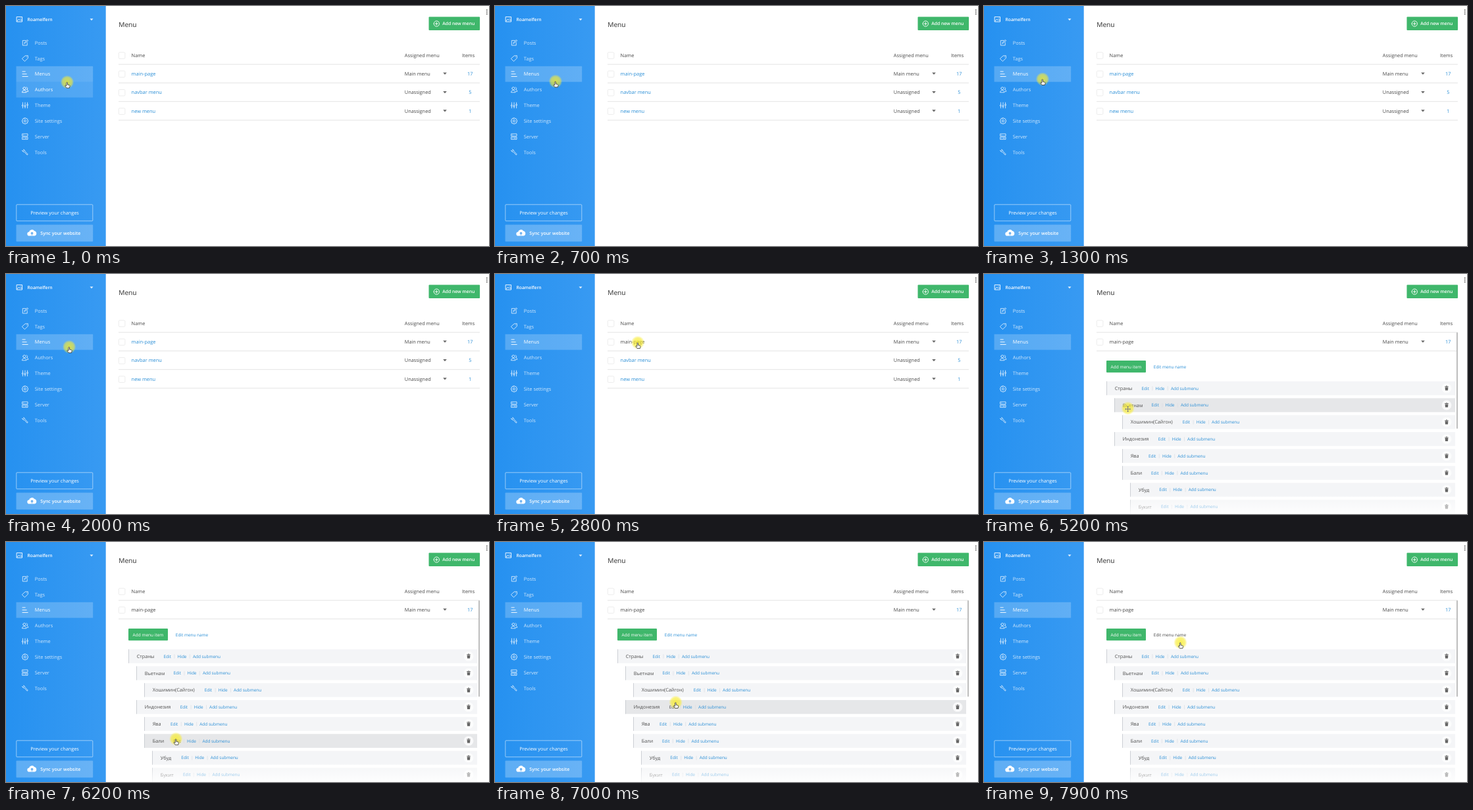
These frames come from a looping animation (734x366 px, 8000 ms). An HTML page:

```html
<!DOCTYPE html>
<html lang="en">
<head>
<meta charset="utf-8">
<title>Menu manager</title>
<style>
html, body { margin: 0; width: 100%; height: 100%; overflow: hidden; background: #fff; }
svg { display: block; width: 734px; height: 366px; }
text { font-family: "Open Sans", "Noto Sans", sans-serif; text-rendering: geometricPrecision; white-space: pre; }
.icon { fill: none; stroke: #fff; stroke-width: .9; stroke-linecap: round; stroke-linejoin: round; }
</style>
</head>
<body>
<svg id="stage" viewBox="0 0 734 366">
  <defs>
    <linearGradient id="blue"><stop stop-color="#2691f0"/><stop offset="1" stop-color="#389af2"/></linearGradient>
    <linearGradient id="veil" x2="0" y2="1">
      <stop stop-color="#fff" stop-opacity="0"/><stop offset="1" stop-color="#fff" stop-opacity=".85"/>
    </linearGradient>
    <radialGradient id="glow">
      <stop stop-color="#f8ec20" stop-opacity=".78"/><stop offset=".7" stop-color="#f8ec30" stop-opacity=".62"/>
      <stop offset="1" stop-color="#f8ec40" stop-opacity=".1"/>
    </radialGradient>
  </defs>
</svg>
<script>
const LOOP = 8000, STEP = 100, OPEN_AT = 3600;
const BLUE = '#2b8fd6', DARK = '#484848', GREEN = '#3fb76b';
const stage = document.getElementById('stage');

function add(parent, tag, attrs) {
  const el = document.createElementNS('http://www.w3.org/2000/svg', tag);
  for (const k in attrs) el.setAttribute(k, attrs[k]);
  return parent.appendChild(el);
}
const group = (parent, attrs = {}) => add(parent, 'g', attrs);
const rect = (parent, x, y, width, height, fill, more = {}) =>
  add(parent, 'rect', { x, y, width, height, fill, ...more });
const path = (parent, d, more = {}) => add(parent, 'path', { d, ...more });
const icon = (parent, x, y, d, more = {}) =>
  path(parent, d, { class: 'icon', transform: `translate(${x} ${y})`, ...more });

// Text whose capitals are centred on y
function label(parent, x, y, words, size, fill, more = {}) {
  const el = add(parent, 'text', { x, y: y + size * .36, 'font-size': size, fill, ...more });
  el.textContent = words;
  return el;
}

// Sidebar
const side = group(stage);
rect(side, 0, 0, 151.7, 366, 'url(#blue)');
icon(side, 20.5, 20.3, 'M-4-3.7H4V3.7H-4ZM-3.6 2.6L-.9-.4 1 1.6 2.2.5 3.8 2M1.6-1.6h.2');
label(side, 32.5, 20.8, 'Roamelfern', 6.75, '#fff', { 'font-weight': 600 });
path(side, 'M127.5 19.3h5l-2.5 3z', { fill: '#fff', opacity: .85 });

const glyphs = {
  Posts: 'M1-3.4H-3.7V4H3.2V-.3M-1 1.2L-.5-.8 3.4-4.4 4.7-3.1 1-.4Z',
  Tags: 'M-4.4.2L.2-4 4.3-4.2 4.4-.3-.3 4.2ZM2.3-2.2h.1',
  Menus: 'M-4-3.8H.2M-4 0H2.2M-4 3.8H4.2',
  Authors: 'M-4.5 3.8C-4.3-.2 1.8-.2 2 3.8ZM-3.2-1.9a2 2 0 1 0 4 0a2 2 0 1 0-4 0M2-3.6C4.6-3 4-.7 2.2-.4 4-.1 4.6 1.2 4.7 2.8H3',
  Theme: 'M-3.6-4.3V-1M-3.6 1.6V4.3M0-4.3V0M0 2.6V4.3M3.6-4.3V-2M3.6.6V4.3M-4.5.3a.9 1.3 0 1 0 1.8 0a.9 1.3 0 1 0-1.8 0M-.9 1.3a.9 1.3 0 1 0 1.8 0a.9 1.3 0 1 0-1.8 0M2.7-.7a.9 1.3 0 1 0 1.8 0a.9 1.3 0 1 0-1.8 0',
  'Site settings': 'M-1.6 0a1.6 1.6 0 1 0 3.2 0a1.6 1.6 0 1 0-3.2 0M-1-4.5H1L1.4-3.3 2.8-3.9 3.9-2.8 3.3-1.4 4.5-1V1L3.3 1.4 3.9 2.8 2.8 3.9 1.4 3.3 1 4.5H-1L-1.4 3.3-2.8 3.9-3.9 2.8-3.3 1.4-4.5 1V-1L-3.3-1.4-3.9-2.8-2.8-3.9-1.4-3.3Z',
  Server: 'M-4-4.2H4V-.8H-4ZM-4 .8H4V4.2H-4ZM-2.4-2.5h.2M-2.4 2.5h.2M0 2.5H2.2',
  Tools: 'M-4.3-2.3L-2.5-.4C-1.5-.6-1-.4-.4.3L3 4.2 4.3 3 .6-.6C0-1.2-.2-1.8-.3-2.5L-2.2-4.3-1.9-2.4-2.5-1.8Z'
};
const navItems = Object.entries(glyphs).map(([name, d], i) => {
  const y = 56 + i * 23.86;
  const bg = rect(side, 15.5, y - 11.9, 116.7, 23.86, '#fff', { opacity: 0 });
  const art = icon(side, 29, y, d);
  const words = label(side, 43.8, y, name, 7.4, '#fff');
  return { name, y, bg, art, words };
});

rect(side, 15.8, 302.8, 116, 25, 'none', { stroke: '#fff', 'stroke-opacity': .65, 'stroke-width': .8, rx: 1 });
label(side, 74, 315.7, 'Preview your changes', 7.3, '#fff', { 'text-anchor': 'middle' });
rect(side, 15.5, 333.5, 116.7, 25.8, '#fff', { opacity: .25, rx: 1 });
path(side, 'M35.5 350.5a3 3 0 0 1-.4-6 4.4 4.4 0 0 1 8-1.4 3.8 3.8 0 0 1 .4 7.4z', { fill: '#fff' });
path(side, 'M39.5 349.6V345.6M37.7 347.2L39.5 345.4 41.3 347.2', { fill: 'none', stroke: '#4a9fee', 'stroke-width': 1.1 });
label(side, 52.3, 346.6, 'Sync your website', 7, '#fff', { 'font-weight': 600 });

// Page head
const page = group(stage);
label(page, 171.2, 28.1, 'Menu', 10.2, '#2f2f2f', { 'font-weight': 500 });
rect(page, 642.5, 16.6, 77.6, 20.4, GREEN, { rx: 1 });
icon(page, 654.3, 27, 'M-4.2 0a4.2 4.2 0 1 0 8.4 0a4.2 4.2 0 1 0-8.4 0M-2 0H2M0-2V2');
label(page, 663.2, 27, 'Add new menu', 6.8, '#fff', { 'font-weight': 600 });
for (const y of [6.2, 9.2, 12.2]) add(page, 'circle', { cx: 730.8, cy: y, r: .9, fill: '#555' });

// Table of menus
const line = (parent, y) => path(parent, `M171 ${y}H720`, { stroke: '#dcdcdc', 'stroke-width': .8 });
const checkbox = (parent, y) => rect(parent, 171.3, y - 4.7, 9.6, 9.6, '#fff', { stroke: '#e8e8e8', 'stroke-width': .8, rx: 1.5 });

checkbox(page, 75.4);
label(page, 190.6, 75, 'Name', 7.4, DARK);
label(page, 605.8, 75, 'Assigned menu', 7.4, DARK);
label(page, 693, 75, 'Items', 7.4, DARK);
line(page, 89);

function tableRow(parent, y, name, use, count) {
  checkbox(parent, y + .4);
  const link = label(parent, 190.6, y, name, 7.45, BLUE);
  label(parent, 605.8, y, use, 7.35, DARK);
  path(parent, `M664.2 ${y - 1.8}h5.6l-2.8 3.3z`, { fill: '#666' });
  label(parent, 705.3, y, count, 7.4, BLUE, { 'text-anchor': 'middle' });
  line(parent, y + 14);
  return link;
}
const mainLink = tableRow(page, 103.3, 'main-page', 'Main menu', '17');
const others = group(page);
tableRow(others, 131.7, 'navbar menu', 'Unassigned', '5');
tableRow(others, 160.1, 'new menu', 'Unassigned', '1');

// Opened menu
const tree = group(page);
rect(tree, 186, 132, 60, 18.2, GREEN, { rx: 1 });
label(tree, 216, 141.5, 'Add menu item', 6.5, '#fff', { 'text-anchor': 'middle' });
const links = [];
function addLink(x, y, words, width) {
  const el = label(tree, x, y, words, 6.45, BLUE);
  links.push({ el, x, y, width });
}
addLink(257.8, 141.5, 'Edit menu name', 49);

// [name, depth, x of the first link]
const entries = [
  ['Страны', 0, 239.5], ['Вьетнам', 1, 254.5], ['Хошимин(Сайгон)', 2, 301.7], ['Индонезия', 1, 264.7],
  ['Ява', 2, 249.9], ['Бали', 2, 254], ['Убуд', 3, 266.3], ['Букит', 3, 269]
];
const bars = entries.map(([name, depth, x], i) => {
  const y = 174.2 + i * 25.82, left = 186 + depth * 12;
  const bg = rect(tree, left, y - 10.6, 532 - depth * 12 - 2, 21.2, '#f4f5f7');
  rect(tree, left, y - 10.6, .9, 21.2, '#c9ccd1');
  label(tree, left + 12.7, y, name, 7.3, '#505050');
  addLink(x, y, 'Edit', 12);
  addLink(x + 21, y, 'Hide', 14.5);
  addLink(x + 44.4, y, 'Add submenu', 42.5);
  path(tree, `M${x + 16.4} ${y - 3}v6.4M${x + 39.8} ${y - 3}v6.4`, { stroke: '#dadde2', 'stroke-width': .7 });
  add(tree, 'circle', { cx: 703, cy: y, r: 7.4, fill: '#fff', opacity: .75 });
  path(tree, `M700.6 ${y - 1.6}h4.8l-.4 4.9h-4zM700.2 ${y - 2.9}h1.8v-.7h2v.7h1.8v.8h-5.6z`, { fill: '#666' });
  return { y, left, bg };
});
rect(tree, 152, 336, 582, 30, 'url(#veil)');
rect(tree, 718, 89, 2, 147, '#bdbdbd', { rx: 1 });

// Pointer
const pointer = group(stage);
add(pointer, 'circle', { r: 10, fill: 'url(#glow)' });
const shapes = {
  hand: path(pointer, 'M-1.1 1.1C-1.1.1.5.1.5 1.1V4L3.2 4.7C4 5 4.2 5.5 4 6.3L3.4 9H-1L-3.2 5.9C-3.2 5-2.3 4.9-1.1 6Z',
    { fill: '#fff', stroke: '#333', 'stroke-width': .8, 'stroke-linejoin': 'round' }),
  move: path(pointer, 'M0-3.2L1.5-1.6H.5V.8H2.9V-.2L4.4 1.3 2.9 2.8V1.8H.5V4.2H1.5L0 5.8-1.5 4.2H-.5V1.8H-2.9V2.8L-4.4 1.3-2.9-.2V.8H-.5V-1.6H-1.5Z',
    { fill: '#444', stroke: '#fff', 'stroke-width': .3 }),
  arrow: path(pointer, 'M0 0V8.6L2 6.8 3.4 9.8 4.6 9.2 3.3 6.3H6Z', { fill: '#fff', stroke: '#333', 'stroke-width': .7 })
};

// [time, x, y]
const route = [
  [0, 93, 116], [500, 93, 116], [1100, 89, 111.5], [1900, 89, 111.5], [2600, 217, 104.5], [4400, 217.3, 104.5],
  [5000, 218.7, 204.7], [5300, 218.7, 204.7], [6000, 258.3, 300.3], [6500, 258.3, 300.3],
  [7100, 276, 240], [7700, 298.5, 153.2], [LOOP, 298.5, 153.2]
];
function pointAt(t) {
  const i = route.findIndex(p => p[0] > t);
  const [t0, x0, y0] = route[i - 1], [t1, x1, y1] = route[i];
  const k = (t - t0) / (t1 - t0), e = k * k * (3 - 2 * k);
  return [x0 + (x1 - x0) * e, y0 + (y1 - y0) * e];
}

function draw(t) {
  const [x, y] = pointAt(t);
  const shown = Math.min(1, Math.max(0, (t - OPEN_AT + STEP) / 200));
  const open = shown > 0;
  let kind = 'arrow';

  for (const { name, y: cy, bg, art, words } of navItems) {
    const over = x > 15.5 && x < 132 && Math.abs(y - cy) < 11.93;
    const active = name === 'Menus';
    if (over) kind = 'hand';
    bg.setAttribute('opacity', active ? .21 : over ? .15 : 0);
    art.setAttribute('opacity', active || over ? 1 : .8);
    words.setAttribute('fill-opacity', active || over ? 1 : .78);
    words.setAttribute('font-weight', active || over ? 500 : 400);
  }

  const onMain = x > 190 && x < 229 && Math.abs(y - 103.3) < 6;
  if (onMain) kind = 'hand';
  mainLink.setAttribute('fill', onMain || open ? DARK : BLUE);
  others.setAttribute('opacity', 1 - shown);
  tree.setAttribute('opacity', shown);

  for (const bar of bars) {
    const over = open && x > bar.left && Math.abs(y - bar.y) < 10.6;
    if (over) kind = 'move';
    bar.bg.setAttribute('fill', over ? '#e6e7e9' : '#f4f5f7');
  }
  for (const l of links) {
    const over = open && x > l.x - 2 && x < l.x + l.width + 2 && Math.abs(y - l.y) < 12.5;
    if (over) kind = 'hand';
    l.el.setAttribute('fill', over ? DARK : BLUE);
  }

  pointer.setAttribute('transform', `translate(${x} ${y})`);
  for (const k in shapes) shapes[k].setAttribute('visibility', k === kind ? 'visible' : 'hidden');
}

const start = performance.now();
function frame() {
  const t = (performance.now() - start) % LOOP;
  draw(Math.floor(t / STEP) * STEP);
  requestAnimationFrame(frame);
}
frame();
</script>
</body>
</html>
```
